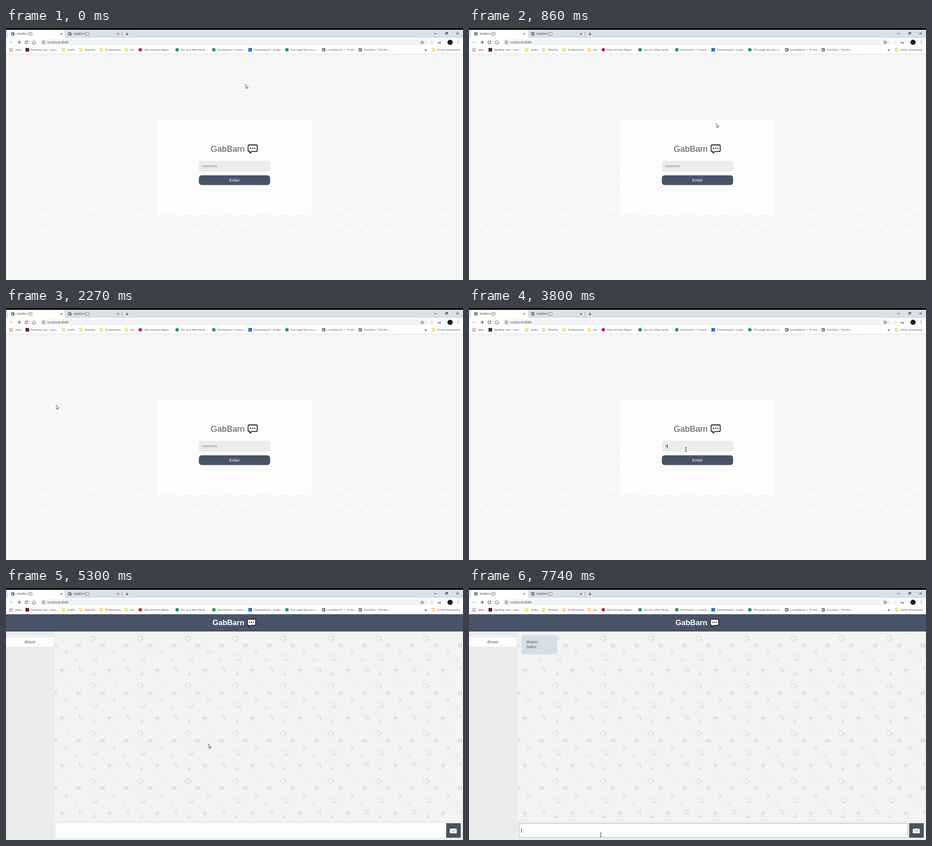
Write an HTML page with a canvas that moves like this. It is 1007 px wide and 556 px high and loops after 8 s.

```html
<!DOCTYPE html>
<html lang="en">
<head>
<meta charset="utf-8">
<title>GabBarn</title>
<style>
  html, body { margin: 0; width: 100%; height: 100%; overflow: hidden; background: #fff; }
  canvas { display: block; }
</style>
</head>
<body>
<canvas id="stage" width="1007" height="556"></canvas>
<script>
const W = 1007, H = 556, LOOP = 8000;
const APP = 'GabBarn', USER = 'dravo', MESSAGE = 'hello!';
const SLATE = '#475468', INK = '#555';
const UI = '"Open Sans", "Noto Sans", sans-serif';
const SANS = '"Liberation Sans", Arial, sans-serif';

const LOGIN_AT = 4470, USER_AT = 4600, SENT_AT = 7570;
const NAME_KEYS = [3800, 3910, 4030, 4150, 4270];
const MESSAGE_KEYS = [6400, 6500, 6600, 6740, 6840, 6940];
const NAME_CARET = [2970, 3800, 4200];
const MESSAGE_CARET = [5900, 6400, 6700, SENT_AT];
// time, x, y
const PATH = [
  [0, 528, 124], [300, 534, 149], [860, 545, 210], [1250, 470, 226],
  [1670, 290, 222], [2270, 111, 214], [2490, 104, 216], [2960, 440, 303],
  [3270, 478, 312], [5080, 478, 312], [5900, 257, 546], [6100, 290.5, 544.5],
  [LOOP, 290.5, 544.5]
];

const screen = document.getElementById('stage').getContext('2d');
let c = screen;

function rect(x, y, w, h, fill) {
  c.fillStyle = fill;
  c.fillRect(x, y, w, h);
}

function round(x, y, w, h, r, fill, stroke, width = 1) {
  c.beginPath();
  c.roundRect(x, y, w, h, r);
  if (fill) { c.fillStyle = fill; c.fill(); }
  if (stroke) { c.strokeStyle = stroke; c.lineWidth = width; c.stroke(); }
}

function disc(x, y, r, fill) {
  c.beginPath();
  c.arc(x, y, r, 0, Math.PI * 2);
  c.fillStyle = fill;
  c.fill();
}

function ring(x, y, r, stroke, width = 1, from = 0, to = Math.PI * 2) {
  c.beginPath();
  c.arc(x, y, r, from, to);
  c.strokeStyle = stroke;
  c.lineWidth = width;
  c.stroke();
}

function line(stroke, width, ...xy) {
  c.beginPath();
  for (let i = 0; i < xy.length; i += 2) c.lineTo(xy[i], xy[i + 1]);
  c.strokeStyle = stroke;
  c.lineWidth = width;
  c.stroke();
}

function shape(fill, ...xy) {
  c.beginPath();
  for (let i = 0; i < xy.length; i += 2) c.lineTo(xy[i], xy[i + 1]);
  c.closePath();
  c.fillStyle = fill;
  c.fill();
}

function text(s, x, y, font, fill = INK, align = 'left') {
  c.font = font;
  c.fillStyle = fill;
  c.textAlign = align;
  c.fillText(s, x, y);
}

function cross(x, y, r, color) {
  line(color, 1, x - r, y - r, x + r, y + r);
  line(color, 1, x + r, y - r, x - r, y + r);
}

function layer(draw) {
  const canvas = document.createElement('canvas');
  canvas.width = W;
  canvas.height = H;
  c = canvas.getContext('2d');
  draw();
  c = screen;
  return canvas;
}

// Speech bubble with three dots, tail at the lower left
function bubble(x, y, w, h, fill, stroke, width) {
  const b = y + h * 0.8;
  c.beginPath();
  c.moveTo(x + 2, y);
  c.arcTo(x + w, y, x + w, b, w * 0.1);
  c.arcTo(x + w, b, x, b, w * 0.1);
  c.lineTo(x + w * 0.43, b);
  c.lineTo(x + w * 0.2, y + h);
  c.lineTo(x + w * 0.2, b);
  c.arcTo(x, b, x, y, w * 0.1);
  c.arcTo(x, y, x + w, y, w * 0.1);
  c.closePath();
  c.fillStyle = fill;
  c.fill();
  c.strokeStyle = stroke;
  c.lineWidth = width;
  c.lineJoin = 'round';
  c.stroke();
  for (const k of [0.27, 0.5, 0.73]) disc(x + w * k, y + h * 0.41, w * 0.065, stroke);
}

function globe(x, y) {
  disc(x, y, 4, '#5f6368');
  shape('#eee', x - 3, y - 1, x, y - 1, x + 1, y + 1, x - 1, y + 3);
  shape('#eee', x, y - 3, x + 2.6, y - 1.4, x + 1, y - 0.6);
}

function folder(x, y) {
  round(x - 3.5, y - 4, 4, 3, 0.5, '#f0cf70');
  round(x - 3.5, y - 3, 7, 7, 0.5, '#fbdf8c');
}

function tab(x, closeX) {
  globe(x, 13);
  text(APP, x + 8.5, 15.3, `6.2px ${UI}`, '#444');
  bubble(x + 35.5, 10, 7, 7.5, '#fff', '#444', 0.8);
  cross(closeX, 13, 2, '#444');
}

function toolbar() {
  const dark = '#4b4e52';
  line('#bbb', 1, 15, 31.5, 8, 31.5);
  line('#bbb', 1, 11.5, 28, 8, 31.5, 11.5, 35);
  line(dark, 1.1, 24.5, 31.5, 31.5, 31.5);
  line(dark, 1.1, 28, 28, 31.5, 31.5, 28, 35);
  ring(45, 31.5, 3.2, dark, 1.1, 0.4, 5.5);
  shape(dark, 48.7, 27.8, 48.7, 31.2, 45.3, 31.2);
  line(dark, 1, 57.5, 32, 61.7, 28, 66, 32);
  line(dark, 1, 59, 31.5, 59, 35.3, 64.5, 35.3, 64.5, 31.5);
  round(76, 25, 854, 13, 6.5, '#f0f2f4');
  ring(82.5, 31.5, 3.4, '#555', 0.9);
  rect(82, 31, 1, 2.7, '#555');
  rect(82, 29.3, 1, 1, '#555');
  text('localhost:8080', 91, 34, `7px ${UI}`, '#444');
  c.beginPath();
  for (let i = 0; i < 10; i++) {
    const a = i * Math.PI / 5 - Math.PI / 2, r = i % 2 ? 1.7 : 3.8;
    c.lineTo(917 + r * Math.cos(a), 31.7 + r * Math.sin(a));
  }
  c.closePath();
  c.strokeStyle = dark;
  c.lineWidth = 0.9;
  c.stroke();
  round(935, 28, 7, 7, 1, '#eee', '#ddd', 0.8);
  disc(955, 31.5, 6, '#fff');
  ring(955, 31.5, 6, '#ddd', 0.8);
  text('(x)', 955, 33.5, `bold 5.5px ${UI}`, '#222', 'center');
  rect(967, 27, 1, 10, '#ddd');
  disc(978.5, 31.5, 5.8, '#1c1c1e');
  for (const y of [28.8, 31.5, 34.2]) disc(996, y, 0.8, '#444');
}

function bookmarks() {
  const y = 48, label = (s, x) => text(s, x, 50.4, `6px ${UI}`, '#444');
  const palette = ['#df4b3c', '#e58a35', '#3f9b55', '#4b83d9'];
  for (let i = 0; i < 9; i++)
    rect(7.5 + (i % 3) * 2.8, 44.5 + Math.floor(i / 3) * 2.8, 1.8, 1.8, palette[i % 4]);
  label('Apps', 20);
  rect(43, 44, 8, 8, '#56262a');
  label('Reading Lists - Lists...', 55);
  [[127, 'drafts'], [165, 'WebDev'], [210, 'ProjectIdeas'], [265, 'Job'], [942, 'Other bookmarks']]
    .forEach(([x, s]) => { folder(x, y); label(s, x + 8.7); });
  disc(296, y, 3.8, '#c8202d');
  label('Zelp Domain Regist...', 304);
  [[377, 'Set up a Web Serve...'], [458, 'Dashboard | Cravon...'], [619, 'This page lets you a...']]
    .forEach(([x, s]) => { disc(x, y, 3.8, '#12965c'); label(s, x + 8); });
  rect(534, 44, 8, 8, '#2673d8');
  label('PalabraNook | Englis...', 546.5);
  [[700, 'LoopMentor | 70 Vid...'], [780.5, 'KnotQuiz - The Wo...']]
    .forEach(([x, s]) => { globe(x, y); label(s, x + 8); });
  text('»', 922.5, 50.8, `bold 8px ${UI}`, '#444');
}

function browser() {
  rect(0, 0, W, 58, '#fff');
  rect(0, 4, W, 18, '#d9e0e8');
  rect(0, 0, W, 4, '#000');
  round(4, 5, 126, 20, [5, 5, 0, 0], '#fff');
  rect(0, 22, W, 18, '#fff');
  tab(15, 122);
  tab(140.5, 247);
  rect(255, 8, 1, 10, '#9aa0a8');
  line('#444', 1.1, 263.5, 13.5, 270, 13.5);
  line('#444', 1.1, 266.8, 10, 266.8, 17);
  rect(944, 12, 5, 1, '#333');
  c.strokeStyle = '#333';
  c.lineWidth = 1;
  c.strokeRect(968.5, 10.5, 3.5, 3.5);
  line('#333', 1, 970, 9.5, 973.5, 9.5, 973.5, 13);
  cross(995, 12, 2.5, '#333');
  toolbar();
  bookmarks();
  rect(0, 57, W, 1, '#dcdee0');
}

function loginPage() {
  rect(0, 58, W, H - 58, '#f8f8f8');
  c.save();
  c.beginPath();
  c.rect(0, 58, W, H - 58);
  c.clip();
  for (let y = 52, row = 0; y < H + 8; y += 5.2, row++) {
    c.beginPath();
    const phase = row % 7 < 4 ? 0 : Math.PI;
    for (let x = 0; x <= W; x += 2)
      c.lineTo(x, y + 2.6 * Math.cos(x * Math.PI * 2 / 42 + phase));
    c.strokeStyle = '#eeeef1';
    c.lineWidth = 1;
    c.stroke();
  }
  c.restore();
  rect(333, 203, 341, 210, '#fdfdfd');
  text(APP, 451, 272.7, `18.75px ${SANS}`, INK);
  bubble(533.5, 258, 20, 18, '#fff', '#111', 1.8);
  round(425, 293, 157, 24, 6, '#ebebeb');
  round(425, 325, 157, 21.5, 6, SLATE);
  text('Enter', 503.5, 338.5, `9.6px ${SANS}`, '#fff', 'center');
  browser();
}

function envelope(x, y, w, h, fill, stroke) {
  rect(x - w / 2, y - h / 2, w, h, fill);
  line(stroke, 1, x - w / 2, y - h / 2, x, y + h * 0.12, x + w / 2, y - h / 2);
}

function doodles(x, y) {
  const tone = '#dfdfe0', paper = '#f3f3f3';
  const at = (dx, dy, angle, draw) => {
    c.save();
    c.translate(x + dx, y + dy);
    c.rotate(angle);
    draw();
    c.restore();
  };
  const device = (w, h) => () => {
    round(-w / 2, -h / 2, w, h, 1.2, null, tone, 1.2);
    rect(-w / 2, h / 2 - 2.5, w, 2, tone);
  };
  at(30, 9, -0.6, () => {
    line(tone, 1, -2, -3, -4, 0, -2, 3);
    line(tone, 1, 2, -3, 4, 0, 2, 3);
  });
  at(83, 15, -0.7, () => {
    round(-4, -5, 8, 10, 1, null, tone, 1.5);
    line(tone, 1.5, 6, -4, 6, 6, -3, 6);
  });
  for (const dx of [0.5, 53]) at(dx, 30.5, 0, () => envelope(0, 0, 10, 8, tone, paper));
  at(25, 46, -0.7, device(6, 9));
  at(47, 64, -0.75, () => {
    line(tone, 2, -5, 0, 5, 0);
    line(paper, 0.7, -3, 0, 2, 0);
  });
  at(90, 57.5, 0, device(9, 11.5));
  at(17, 86.5, 0, () => {
    rect(-5, -4, 7, 6, tone);
    ring(2.5, -1.3, 2, tone);
    rect(-5, 4, 8, 1.2, tone);
  });
  at(58, 83.5, -0.6, () => {
    ring(0, 0, 3.6, tone, 1.6);
    rect(-2, -6.5, 4, 2.5, tone);
    rect(-2, 4, 4, 2.5, tone);
  });
  at(86, 93, 0, () => {
    shape(tone, 5, -5, -5, 1, -1.5, 2);
    shape(tone, 5, -5, -0.5, 2.5, 3, 5);
    line(tone, 1, -1.5, 2, -1.5, 5);
  });
}

function chatPage() {
  rect(0, 58, W, H - 58, '#ebebeb');
  rect(107, 514, 900, 42, '#eeeef0');
  c.save();
  c.beginPath();
  c.rect(107, 96, 898, 418);
  c.clip();
  rect(107, 96, 898, 418, '#f3f3f3');
  for (let y = 96; y < 514; y += 105)
    for (let x = 107; x < W; x += 105) doodles(x, y);
  c.restore();
  rect(0, 58, W, 38, SLATE);
  text(APP, 455, 82.4, `bold 16.6px ${SANS}`, '#fff');
  bubble(532, 69, 18, 16.5, '#fff', '#111', 1.5);
  rect(110, 519, 857, 32, '#fdfdfd');
  rect(970, 519, 32, 32, SLATE);
  envelope(985.5, 536, 17, 12, '#f8f8f8', '#777');
  c.strokeStyle = '#222';
  c.strokeRect(977, 530, 17, 12);
  browser();
}

const login = layer(loginPage), chat = layer(chatPage);

// Cubic easing through the path, at rest wherever a point repeats
function cursorAt(t) {
  const slope = (i, k) => {
    const a = PATH[i - 1], p = PATH[i], b = PATH[i + 1];
    if (!a || !b || a[k] === p[k] || b[k] === p[k]) return 0;
    return (b[k] - a[k]) / (b[0] - a[0]);
  };
  let i = 0;
  while (i < PATH.length - 2 && t >= PATH[i + 1][0]) i++;
  const p = PATH[i], q = PATH[i + 1], d = q[0] - p[0], u = (t - p[0]) / d;
  const first = i === 0;
  return [1, 2].map(k => {
    const m = first ? (q[k] - p[k]) / d : slope(i, k), n = slope(i + 1, k);
    return (2 * u ** 3 - 3 * u * u + 1) * p[k] + (u ** 3 - 2 * u * u + u) * d * m
      + (3 * u * u - 2 * u ** 3) * q[k] + (u ** 3 - u * u) * d * n;
  });
}

function arrow(x, y) {
  c.beginPath();
  [[0, 0], [0, 9], [2, 7.2], [3.3, 10], [4.6, 9.4], [3.4, 6.6], [6, 6.4]]
    .forEach(([dx, dy]) => c.lineTo(x + dx, y + dy));
  c.closePath();
  c.fillStyle = '#fff';
  c.fill();
  c.strokeStyle = '#333';
  c.lineWidth = 0.8;
  c.stroke();
}

function beam(x, y) {
  line('#333', 1, x, y - 4, x, y + 4);
  for (const dy of [-4.3, 4.3]) line('#333', 0.9, x - 2, y + dy, x + 2, y + dy);
}

const typed = (s, keys, t) => s.slice(0, keys.filter(k => k <= t).length);

function caretOn(anchors, t) {
  const since = anchors.filter(a => a <= t).pop();
  return since !== undefined && Math.floor((t - since) / 500) % 2 === 0;
}

function loginState(t) {
  c.drawImage(login, 0, 0);
  const name = typed(USER, NAME_KEYS, t), font = `bold 6.8px ${SANS}`;
  text(name || 'Username', 432.5, 307.4, font, name ? INK : '#999');
  if (caretOn(NAME_CARET, t)) {
    c.font = font;
    rect(Math.round(433 + c.measureText(name).width), 301, 1, 9, '#333');
  }
}

function chatState(t) {
  c.drawImage(chat, 0, 0);
  const font = `9.6px ${SANS}`;
  if (t >= USER_AT) {
    rect(0, 108, 105, 21.5, '#fdfdfd');
    text(USER, 52.3, 122, font, INK, 'center');
  }
  if (t >= SENT_AT) {
    round(115.5, 104, 78.5, 42.5, 5, '#d6dfe9');
    text(USER + ':', 126, 122, font);
    text(MESSAGE, 126, 133, font);
  }
  if (t >= MESSAGE_CARET[0]) {
    c.strokeStyle = '#94b9e8';
    c.lineWidth = 1;
    c.strokeRect(110.5, 519.5, 856, 31);
  }
  const draft = t < SENT_AT ? typed(MESSAGE, MESSAGE_KEYS, t) : '';
  const draftFont = `9.3px ${SANS}`;
  text(draft, 115, 538.3, draftFont);
  if (caretOn(MESSAGE_CARET, t)) {
    c.font = draftFont;
    rect(Math.round(115 + c.measureText(draft).width), 529.5, 1, 11, '#333');
  }
}

function frame(now) {
  const t = now % LOOP, inChat = t >= LOGIN_AT, [x, y] = cursorAt(t);
  (inChat ? chatState : loginState)(t);
  const overField = inChat
    ? x > 110 && x < 967 && y > 519 && y < 551
    : x > 425 && x < 582 && y > 293 && y < 317;
  (overField ? beam : arrow)(x, y);
  requestAnimationFrame(frame);
}
requestAnimationFrame(frame);
</script>
</body>
</html>
```
